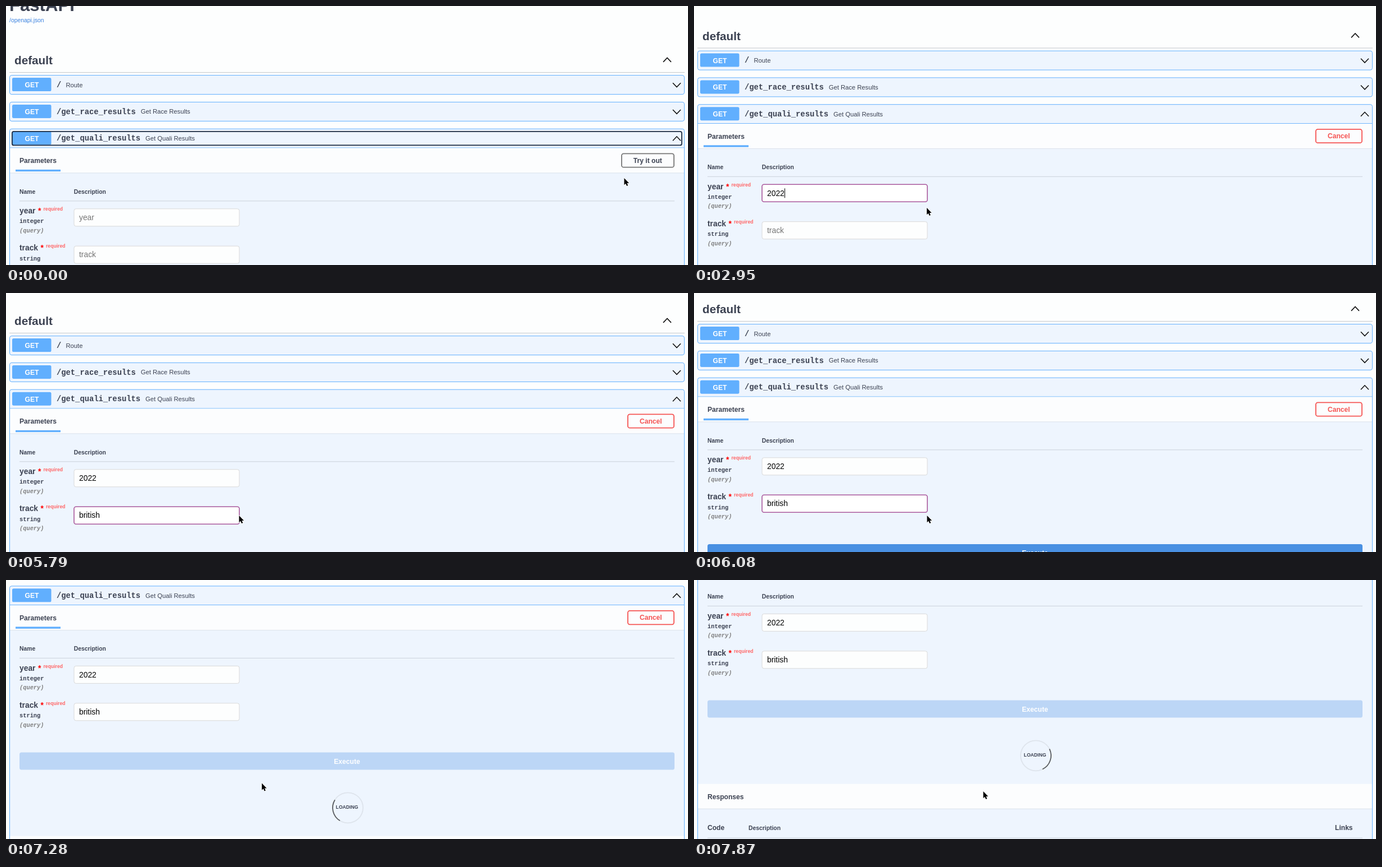
An HTML page that plays this animation: 1213x462 px, repeating every 8 s.

```html
<!DOCTYPE html>
<html lang="en">
<head>
<meta charset="utf-8">
<title>API docs</title>
<style>
  html, body { margin: 0; width: 100%; height: 100%; overflow: hidden; background: #fdfefe; }
  svg { display: block; width: 1213px; height: 462px; }
  text { font-family: "Liberation Sans", Arial, sans-serif; fill: #3b4151; white-space: pre; }
  .b { font-weight: 700; }
  .mono { font-family: "Liberation Mono", "Courier New", monospace; font-weight: 700; }
  .mid { text-anchor: middle; }
  .white { fill: #fff; }
  .query { font-style: italic; fill: #808080; }
  .star { fill: #f00; }
  .req { fill: #ff6666; }
  .link { fill: #3b82df; }
  .red { fill: #f55453; }
  .block { fill: #eef5fe; stroke: #61affe; }
  .method { fill: #61affe; }
  .chevron { fill: none; stroke: #111; stroke-width: 1.6; }
  .field { fill: #fdfefe; stroke: #d9d9d9; }
  .field.focus { fill: #fff; stroke: #a9599d; stroke-width: 1.6; }
  .value { fill: #000; }
  .value.hint { fill: #757575; }
  .button { fill: none; stroke-width: 1.8; }
</style>
</head>
<body>
<svg id="stage" viewBox="0 0 1213 462" xmlns="http://www.w3.org/2000/svg"></svg>
<script>
const LOOP = 8000;
const TEXT_X = 130;
const ROW_GAP = 66.4;

const text = (x, y, size, str, cls = '') =>
  `<text x="${x}" y="${y}" font-size="${size}" class="${cls}">${str}</text>`;
const rect = (x, y, w, h, attrs) =>
  `<rect x="${x}" y="${y}" width="${w}" height="${h}" ${attrs}/>`;
const chevron = (x, y, dir) =>
  `<path class="chevron" d="M${x - 7} ${y - 3.7 * dir}l7 ${7.4 * dir}l7 ${-7.4 * dir}"/>`;
const rule = (x, y, w, color) => rect(x, y, w, 1, `fill="${color}"`);

// One endpoint row; the open one is taller and its chevron points up.
function endpoint(y, path, label, labelX, open) {
  return rect(6.5, y, 1200, open ? 900 : 34, 'rx="3.5" class="block"') +
    rect(11, y + 4.5, 69.5, 24, 'rx="2.6" class="method"') +
    text(46, y + 21.4, 12.1, 'GET', 'b mid white') +
    text(90, y + 21.2, 13.8, path, 'mono') +
    text(labelX, y + 20.9, 11.23, label) +
    chevron(1193, y + 17.3, open ? -1 : 1);
}

function param(row, name, type, starX) {
  const y = row * ROW_GAP;
  return text(24, 370 + y, 13.83, name, 'b') +
    text(starX, 370 + y, 13.83, '*', 'b star') +
    text(starX + 9.5, 365 + y, 8.64, 'required', 'b req') +
    text(24, 387.3 + y, 10.37, type, 'mono') +
    text(24, 403.8 + y, 10.37, '(query)', 'mono query') +
    rect(121, 361.8 + y, 294, 31, `rx="3.5" class="field" id="${name}Box"`) +
    `<text id="${name}" x="${TEXT_X}" y="${382 + y}" font-size="13.83"></text>`;
}

const sectionHead = (y, title) =>
  rect(7, y, 1199, 44, 'fill="#fcfdfe"') +
  rule(7, y + 44, 1199, '#dde3ea') +
  text(24, y + 26.8, 12.1, title, 'b');

const page =
  text(6, 8.5, 31.1, 'FastAPI', 'b') +
  text(6, 28.6, 10.37, '/openapi.json', 'link') +
  text(15, 104, 20.7, 'default', 'b') +
  chevron(1176, 96.2, -1) +
  rule(6, 118, 1201, '#c5c8cc') +
  endpoint(123.6, '/', 'Route', 106.5) +
  endpoint(171.4, '/get_race_results', 'Get Race Results', 239.7) +
  endpoint(219.2, '/get_quali_results', 'Get Quali Results', 248, true) +
  rect(10.9, 223.8, 1191, 24.6, 'rx="3" fill="none" stroke="#1c2b40" stroke-width="1.8" id="rowFocus"') +
  rule(7, 252.5, 1199, '#61affe') +
  sectionHead(253.4, 'Parameters') +
  rect(17, 291.8, 80, 3.4, 'class="method"') +
  `<g id="tryOut">${rect(1095, 263.3, 93, 24.4, 'rx="3.5" class="button" stroke="#777"')}
    ${text(1141.3, 279.8, 12.1, 'Try it out', 'b mid')}</g>` +
  `<g id="cancel">${rect(1106, 263.3, 82, 24.4, 'rx="3.5" class="button" stroke="#f55453"')}
    ${text(1146.8, 279.8, 12.1, 'Cancel', 'b mid red')}</g>` +
  text(24, 334.5, 10.37, 'Name', 'b') +
  text(120.8, 334.5, 10.37, 'Description', 'b') +
  rule(24, 347.3, 1165, '#cbd2db') +
  param(0, 'year', 'integer', 57) +
  param(1, 'track', 'string', 61.5) +
  rect(0, 0, 1, 17, 'id="caret"') +
  `<g id="execute">${rect(24, 516, 1165, 31, 'rx="3.5" fill="#4990e2" id="executeFill"')}
    ${text(606.5, 536, 12.1, 'Execute', 'b mid white')}</g>` +
  `<g id="loading" fill="none" stroke-width="1.8">
    <circle cx="608" cy="614.7" r="27" stroke="#555" stroke-opacity=".1"/>
    <circle id="arc" cx="608" cy="614.7" r="27" stroke="#000" stroke-opacity=".6" pathLength="4" stroke-dasharray="1 3"/>
    ${text(606.5, 616.5, 8.64, 'LOADING', 'b mid')}</g>` +
  sectionHead(665.2, 'Responses') +
  text(24, 747.6, 12.1, 'Code', 'b') +
  text(97, 747, 10.37, 'Description', 'b') +
  text(1140, 747.6, 12.1, 'Links', 'b') +
  rule(24, 761, 1165, '#cbd2db');

const pointer = `<g id="cursor">
  <path id="arrow" d="M0 0V12.2L2.7 9.7L4.6 13.9L6.8 12.9L4.9 8.9H8.6Z" fill="#000" stroke="#fff" stroke-width="1.1" paint-order="stroke"/>
  <path id="beam" d="M-3 -7Q0 -7 0 -5Q0 -7 3 -7M0 -5V5M-3 7Q0 7 0 5Q0 7 3 7M-1.5 3H1.5" fill="none" stroke="#111" stroke-width="1.3"/>
  <g id="denied"><circle cx="8.3" cy="18.3" r="7.2" fill="#e8edf3" stroke="#fff" stroke-width="3"/>
    <path d="M15.5 18.3a7.2 7.2 0 1 0-14.4 0a7.2 7.2 0 1 0 14.4 0M3.2 13.2l10.2 10.2" fill="none" stroke="#7c8794" stroke-width="1.6"/></g>
</g>`;

document.getElementById('stage').innerHTML = `<g id="page">${page}</g>${pointer}`;
const el = id => document.getElementById(id);
const show = (id, on) => el(id).setAttribute('visibility', on ? 'visible' : 'hidden');

// Each step holds until the next and keeps whatever it does not change.
const steps = [
  [0, { at: [1099.5, 307], shape: 'arrow', scroll: 0, editing: false, rowFocus: true,
        focus: '', caret: false, year: '', track: '', alpha: 1, loading: false }],
  [150, { at: [1106, 299] }],
  [300, { at: [1121, 285] }],
  [450, { at: [1126, 280] }],
  [600, { editing: true, rowFocus: false }],
  [740, { at: [1040, 296] }],
  [890, { at: [742, 345] }],
  [1040, { at: [470, 377] }],
  [1170, { at: [405, 380], shape: 'beam' }],
  [1320, { focus: 'year' }],
  [1460, { caret: true }],
  [1910, { year: '2' }],
  [2060, { year: '20' }],
  [2210, { year: '202' }],
  [2510, { year: '2022' }],
  [2660, { at: [414, 360], shape: 'arrow' }],
  [2950, { scroll: 43.5 }],
  [3100, { scroll: 47, at: [413, 368] }],
  [3250, { at: [408, 390], shape: 'beam' }],
  [3400, { at: [406, 398], focus: 'track', caret: false }],
  [3550, { caret: true }],
  [3990, { caret: false }],
  [4290, { track: 'b', caret: true }],
  [4440, { track: 'br' }],
  [4590, { track: 'brit' }],
  [4740, { track: 'briti' }],
  [5190, { track: 'britis' }],
  [5340, { track: 'british' }],
  [5640, { at: [411, 397], caret: false }],
  [5790, { at: [414.5, 397], shape: 'arrow' }],
  [5940, { scroll: 68 }],
  [6090, { scroll: 102 }],
  [6240, { scroll: 116, at: [420, 398] }],
  [6390, { scroll: 119, at: [428.5, 398] }],
  [6540, { focus: '', alpha: .85 }],
  [6680, { alpha: .5, shape: 'denied', at: [428.5, 397.5] }],
  [6830, { alpha: .3, at: [438, 386], shape: 'arrow' }],
  [6980, { at: [455, 362.5] }],
  [7280, { scroll: 208.4, loading: true }],
  [7430, { scroll: 246 }],
  [7580, { scroll: 276, at: [466, 365] }],
  [7730, { scroll: 294, at: [496, 372] }],
  [7870, { scroll: 301.4, at: [514.5, 377] }]
];

function fillField(name, s) {
  const node = el(name);
  node.textContent = s[name] || name;
  node.setAttribute('class', s[name] ? 'value' : 'value hint');
  el(name + 'Box').setAttribute('class', s.focus === name ? 'field focus' : 'field');
}

function draw(time) {
  const past = steps.filter(([start]) => start <= time);
  const s = Object.assign({}, ...past.map(step => step[1]));
  const stepTime = past[past.length - 1][0];

  el('page').setAttribute('transform', `translate(0 ${-s.scroll})`);
  el('cursor').setAttribute('transform', `translate(${s.at})`);
  show('arrow', s.shape !== 'beam');
  show('beam', s.shape === 'beam');
  show('denied', s.shape === 'denied');
  show('rowFocus', s.rowFocus);
  show('tryOut', !s.editing);
  show('cancel', s.editing);
  show('execute', s.editing);
  el('executeFill').setAttribute('fill-opacity', s.alpha);

  fillField('year', s);
  fillField('track', s);
  show('caret', s.focus && s.caret);
  if (s.focus) {
    const width = s[s.focus] ? el(s.focus).getComputedTextLength() : 0;
    el('caret').setAttribute('x', Math.round(TEXT_X + width));
    el('caret').setAttribute('y', 368.8 + (s.focus === 'track' ? ROW_GAP : 0));
  }

  show('loading', s.loading);
  const turn = 121.5 + (stepTime - 7280) * .36;
  el('arc').setAttribute('transform', `rotate(${turn} 608 614.7)`);
}

let origin;
function tick(now) {
  origin ??= now;
  draw(Math.max(0, now - origin) % LOOP);
  requestAnimationFrame(tick);
}
draw(0);
requestAnimationFrame(tick);
</script>
</body>
</html>
```
